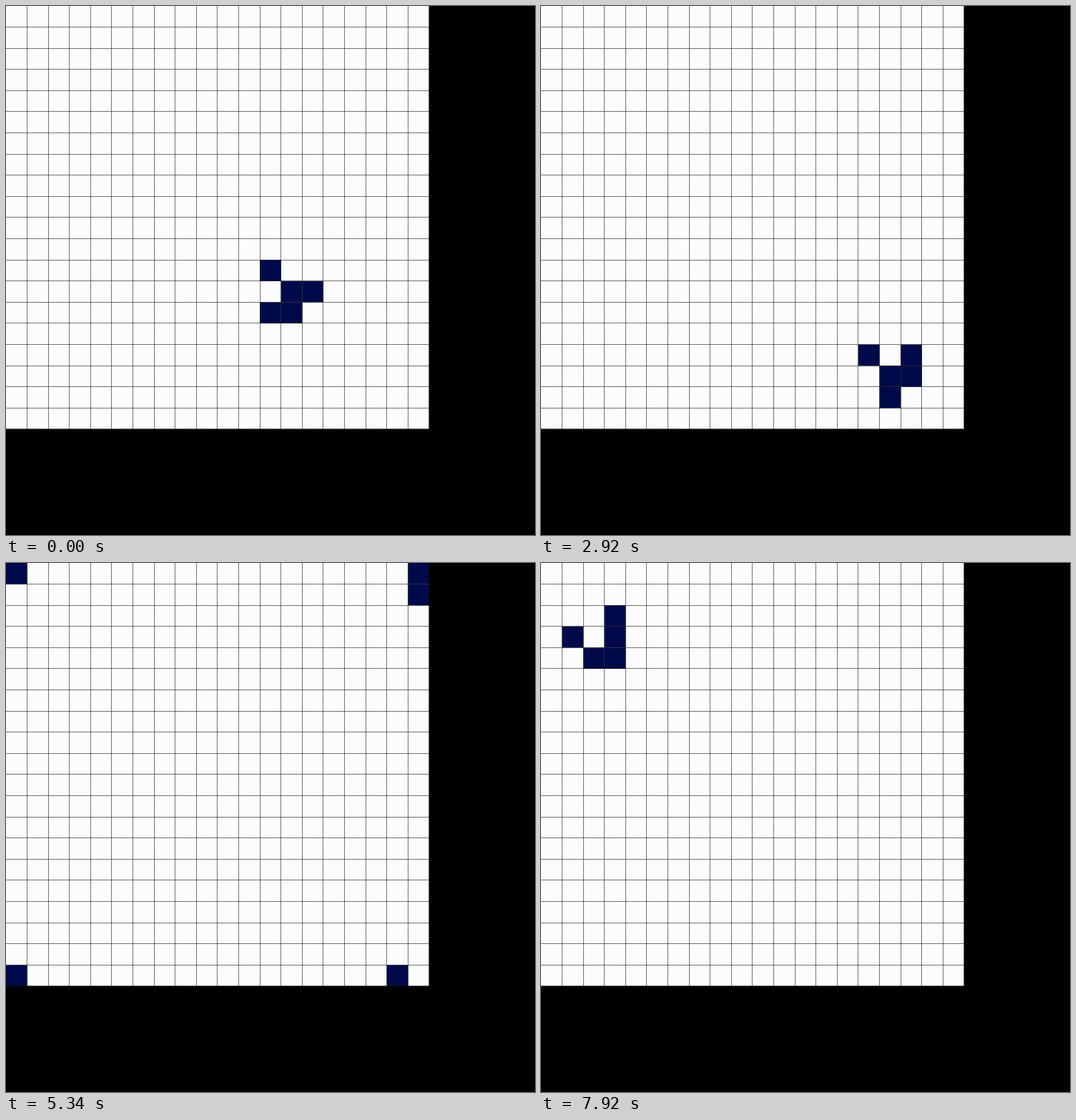
An HTML page with a canvas that plays this animation: 640x640 px, repeating every 8000 ms.

```html
<!DOCTYPE html>
<html lang="en">
<head>
<meta charset="utf-8">
<title>Glider on a torus</title>
<style>
  html, body { margin: 0; height: 100%; overflow: hidden; background: #000; }
  canvas { display: block; width: 640px; height: 640px; }
</style>
</head>
<body>
<canvas id="stage" width="640" height="640"></canvas>
<script>
const ctx = document.getElementById('stage').getContext('2d');
const SIZE = 20, BOARD = 512, CELL = BOARD / SIZE, LOOP = 8000, GENERATIONS = 40;
const POINTER = new Path2D('M0 0V9L2 7.5L4 11.5L5 11L3.5 7H6.5Z');

const wrap = v => (v + SIZE) % SIZE;

// Conway's rules on a board whose opposite sides meet
function evolve(cells) {
  const alive = new Set(cells.map(([x, y]) => y * SIZE + x));
  const counts = new Map();
  for (const [x, y] of cells)
    for (let dy = -1; dy <= 1; dy++)
      for (let dx = -1; dx <= 1; dx++) {
        if (!dx && !dy) continue;
        const id = wrap(y + dy) * SIZE + wrap(x + dx);
        counts.set(id, (counts.get(id) || 0) + 1);
      }
  return [...counts]
    .filter(([id, n]) => n === 3 || (n === 2 && alive.has(id)))
    .map(([id]) => [id % SIZE, Math.floor(id / SIZE)]);
}

// About 200 ms per generation on a 12 fps clock, with one late tick that is slowly recovered
function startOf(n) {
  const lag = n < 28 ? 0 : 1.6 - 0.12 * (n - 28);
  const tick = n ? Math.round(2.4 * n + 0.2 + lag) : 0;
  return Math.ceil(tick * 100 / 12) * 10;
}

const history = [[[12, 12], [13, 13], [14, 13], [12, 14], [13, 14]]];
while (history.length < GENERATIONS) history.push(evolve(history[history.length - 1]));
const starts = history.map((_, n) => startOf(n));

function rect(color, x, y, w, h) {
  ctx.fillStyle = color;
  ctx.fillRect(x, y, w, h);
}

function drawBoard(cells) {
  rect('#000', 0, 0, 640, 640);
  rect('#fcfcfe', 0, 0, BOARD, BOARD);
  for (const [col, row] of cells) rect('#000a4a', col * CELL, row * CELL, CELL, CELL);
  for (let k = 1; k <= SIZE; k++) {
    const line = Math.ceil(k * CELL - 1);
    rect('rgba(16, 16, 0, 0.5)', line, 0, 1, BOARD);
    rect('rgba(16, 16, 0, 0.5)', 0, line, BOARD, 1);
  }
}

function drawPointer(t) {
  if (t < 3250 || t >= 4420) return;
  const tick = Math.floor(t * 12 / 1000);
  const p = Math.min(1, Math.max(0, (tick - 42) / 8));
  ctx.save();
  ctx.translate(273.5 - 160 * p, 82.5 + 4 * p);
  ctx.fillStyle = '#fff';
  ctx.strokeStyle = '#777';
  ctx.stroke(POINTER);
  ctx.fill(POINTER);
  ctx.restore();
}

function draw(now) {
  const t = now % LOOP;
  const generation = starts.filter(start => start <= t).length - 1;
  drawBoard(history[generation]);
  drawPointer(t);
}

function loop(now) {
  draw(now);
  requestAnimationFrame(loop);
}
draw(0);
requestAnimationFrame(loop);
</script>
</body>
</html>
```
